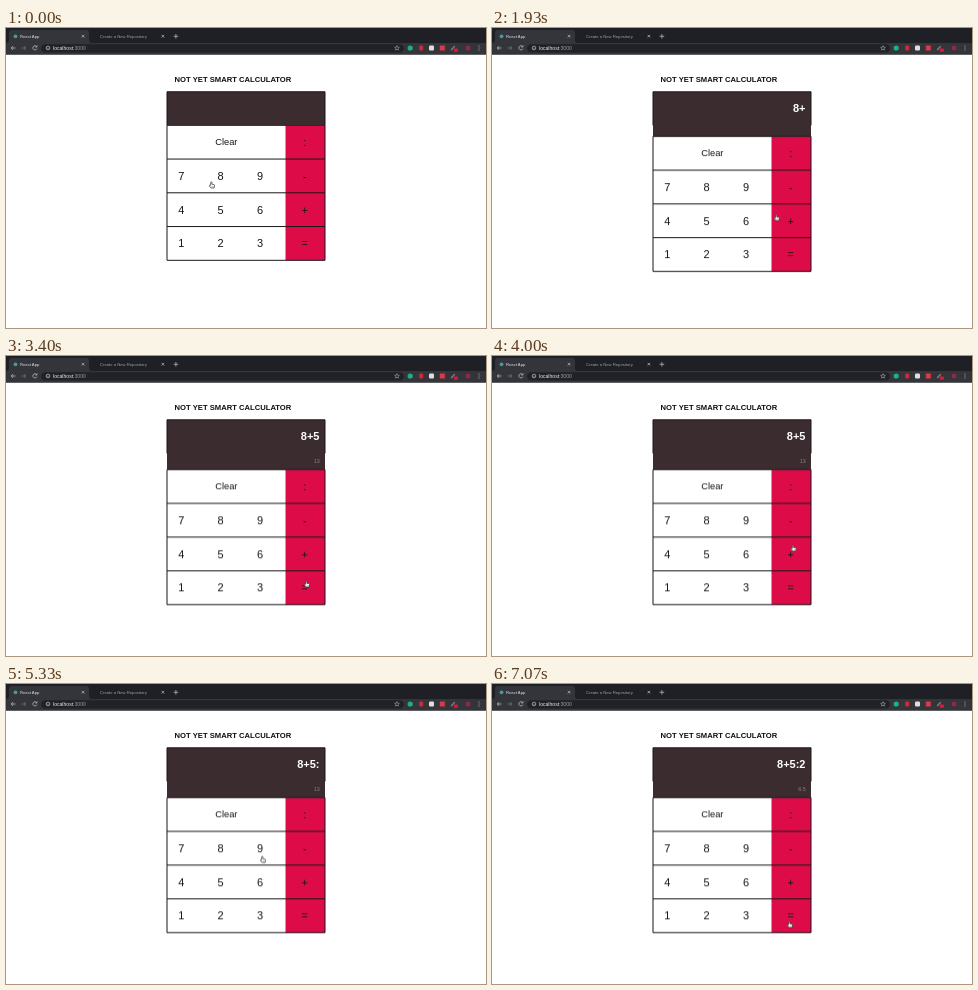
Write an HTML page that moves like this. It is 480 px wide and 300 px high and loops after 8 s.

```html
<!DOCTYPE html>
<html lang="en">
<head>
<meta charset="utf-8">
<title>React App</title>
<style>
  html, body { margin: 0; width: 100%; height: 100%; overflow: hidden; background: #fff; }
  svg { display: block; width: 100vw; height: 100vh; }
  text { font-family: "Liberation Sans", Arial, sans-serif; }
  .tab { font-size: 4.2px; }
  .url { font-size: 5.1px; fill: #e8eaed; }
  .icon { fill: none; stroke: #c4c7cb; stroke-width: .7; }
  .title { font-size: 7.65px; font-weight: bold; fill: #111; }
  .key { font-size: 11px; fill: #151515; text-anchor: middle; }
  .clear { font-size: 9.3px; }
  .line { fill: none; stroke: #1c1518; stroke-width: 1; }
  .entry { font-size: 11px; font-weight: bold; fill: #fff; text-anchor: end; }
  .result { font-size: 5.4px; fill: #8d8386; text-anchor: end; }

  .entry, .result { opacity: 0; animation: 8s step-end infinite; }
  .e1 { animation-name: e1; }
  .e2 { animation-name: e2; }
  .e3 { animation-name: e3; }
  .e4 { animation-name: e4; }
  .e5 { animation-name: e5; }
  .r1 { animation-name: r1; }
  .r2 { animation-name: r2; }
  @keyframes e1 { 0% { opacity: 0 } 10.87% { opacity: 1 } 19.12%, 100% { opacity: 0 } }
  @keyframes e2 { 0% { opacity: 0 } 19.12% { opacity: 1 } 32.5%, 100% { opacity: 0 } }
  @keyframes e3 { 0% { opacity: 0 } 32.5% { opacity: 1 } 62.5%, 100% { opacity: 0 } }
  @keyframes e4 { 0% { opacity: 0 } 62.5% { opacity: 1 } 80.8%, 100% { opacity: 0 } }
  @keyframes e5 { 0% { opacity: 0 } 80.8%, 100% { opacity: 1 } }
  @keyframes r1 { 0% { opacity: 0 } 41.6% { opacity: 1 } 88.3%, 100% { opacity: 0 } }
  @keyframes r2 { 0% { opacity: 0 } 88.3%, 100% { opacity: 1 } }

  /* the keypad is pushed down as the display grows */
  #pad { animation: grow 8s step-end infinite; }
  @keyframes grow {
    0% { transform: translate(161px, 97.3px) }
    10.87% { transform: translate(161px, 108.4px) }
    41.6%, 100% { transform: translate(161px, 113.6px) }
  }

  #hand { animation: point 8s linear infinite; }
  @keyframes point {
    0%, .5% { transform: translate(206px, 157px) }
    1.62%, 3.7% { transform: translate(219px, 157.5px) }
    6.62%, 10.87% { transform: translate(216px, 155px) }
    12.5% { transform: translate(230px, 159px) }
    16.6% { transform: translate(296px, 190px); animation-timing-function: ease-out }
    20%, 22.9% { transform: translate(300px, 196px) }
    26% { transform: translate(262px, 180px); animation-timing-function: ease-out }
    30%, 32.5% { transform: translate(219px, 194px); animation-timing-function: ease-in }
    36.62% { transform: translate(286px, 216px); animation-timing-function: ease-out }
    40%, 45.4% { transform: translate(301px, 228px); animation-timing-function: ease-in-out }
    55.87% { transform: translate(302.5px, 138px) }
    56.62%, 62.5% { transform: translate(303px, 138.5px); animation-timing-function: ease-in-out }
    66.62%, 74.6% { transform: translate(257px, 175.5px); animation-timing-function: ease-in-out }
    78.4%, 80.8% { transform: translate(216px, 237px); animation-timing-function: ease-in-out }
    85% { transform: translate(294px, 236.5px) }
    86.62%, 100% { transform: translate(298px, 240.5px) }
  }
</style>
</head>
<body>
<svg viewBox="0 0 480 300">
  <rect width="480" height="300" fill="#fff"/>

  <!-- browser bar -->
  <rect width="480" height="26.5" fill="#1e2025"/>
  <path d="M0 15Q3 15 3 12V5Q3 2 6 2H80Q83 2 83 5V12Q83 15 86 15H480V26.5H0Z" fill="#33353a"/>
  <rect x="35" y="16.2" width="363" height="8.4" rx="4.2" fill="#202227"/>
  <circle cx="9.5" cy="8.3" r="1.9" fill="#3f9aa8"/>
  <text class="tab" x="14" y="9.8" fill="#dfe1e5">React App</text>
  <text class="tab" x="94" y="9.8" fill="#9da1a7">Create a New Repository</text>
  <g class="icon">
    <path d="M75.8 6.9l2.6 2.6m0-2.6l-2.6 2.6M155.6 6.9l2.6 2.6m0-2.6l-2.6 2.6M167.6 8.3h4.6m-2.3-2.3v4.6"/>
    <path d="M9.5 20H5.2m2-2l-2 2 2 2"/>
    <path d="M15.5 20h4.3m-2-2l2 2-2 2" stroke="#74777c"/>
    <path d="M30.6 18.6a2.1 2.1 0 1 0 .3 2M31 17.4v1.6h-1.6"/>
    <circle cx="42" cy="20" r="1.8"/>
    <path d="M42 19.7v1.2" stroke-width=".6"/>
    <path d="M391 17.7l.7 1.5 1.6.2-1.2 1.1.3 1.6-1.4-.8-1.4.8.3-1.6-1.2-1.1 1.6-.2z" stroke-width=".5"/>
    <path d="M445.2 22l3.6-3.8" stroke="#85888d" stroke-width="1.2"/>
  </g>
  <text class="url" x="47" y="21.8">localhost<tspan fill="#9aa0a6">:3000</tspan></text>
  <circle cx="404.2" cy="20" r="2.6" fill="#18b287"/>
  <rect x="413.3" y="17.6" width="3.8" height="4.8" fill="#d5263c"/>
  <rect x="423" y="17.5" width="5" height="5" rx="1" fill="#dedfe1"/>
  <rect x="433.8" y="17.5" width="5" height="5" fill="#d93a4a"/>
  <rect x="447.8" y="20.4" width="4.2" height="3.4" rx=".7" fill="#d7193c"/>
  <circle cx="462" cy="20" r="2.5" fill="#8d2942"/>
  <g fill="#c4c7cb">
    <circle cx="473" cy="18" r=".5"/><circle cx="473" cy="20" r=".5"/><circle cx="473" cy="22" r=".5"/>
  </g>

  <!-- calculator -->
  <text class="title" x="168.6" y="54.2">NOT YET SMART CALCULATOR</text>
  <g id="pad">
    <path d="M0 0V-33.6H158V0Z" fill="#3b2c30"/>
    <path d="M0 0V-49.6H158V0Z" fill="#3b2c30" clip-path="url(#below)"/>
    <rect width="158" height="135" fill="#fff"/>
    <rect x="118.5" width="39.5" height="135" fill="#dd0c48"/>
    <g id="keys"></g>
    <path class="line" d="M0 0H158M0 33.75H158M0 67.5H158M0 101.25H158"/>
    <path class="line" d="M0 0V135H158V0" stroke-width=".8"/>
  </g>
  <clipPath id="below"><rect y="-33" width="158" height="33"/></clipPath>
  <rect x="161" y="63.8" width="158" height="33.6" fill="#3b2c30"/>
  <path class="line" d="M161 97.3V63.8H319V97.3" stroke-width=".8"/>
  <path class="line" id="seam" d="M161 97.3H319"/>
  <text class="entry e1" x="313.5" y="84.2">8</text>
  <text class="entry e2" x="313.5" y="84.2">8+</text>
  <text class="entry e3" x="313.5" y="84.2">8+5</text>
  <text class="entry e4" x="313.5" y="84.2">8+5:</text>
  <text class="entry e5" x="313.5" y="84.2">8+5:2</text>
  <text class="result r1" x="313.7" y="106.6">13</text>
  <text class="result r2" x="313.7" y="106.6">6.5</text>

  <g id="hand">
    <path d="M-1.3 .3V-2.5Q-1.3 -3.2 -.7 -3.2Q-.1 -3.2 -.1 -2.5V-.8L2 -.4Q2.7 -.2 2.6 .6L2.1 3H-1L-2.6 .9Q-2.8 .2 -2.1 0Z"
          fill="#fff" stroke="#222" stroke-width=".65" stroke-linejoin="round"/>
    <path d="M.2 1V2.3M1.2 1V2.3" stroke="#555" stroke-width=".35"/>
  </g>
</svg>
<script>
  const keys = document.getElementById("keys");
  const columns = [14.2, 53.6, 93, 137.8];

  function addKey(label, x, row, kind = "") {
    const key = document.createElementNS("http://www.w3.org/2000/svg", "text");
    key.setAttribute("class", "key " + kind);
    key.setAttribute("x", x);
    key.setAttribute("y", row * 33.75 + (kind ? 20.1 : 20.8));
    key.textContent = label;
    keys.append(key);
  }

  addKey("Clear", 59.3, 0, "clear");
  addKey(":", columns[3], 0);
  ["789-", "456+", "123="].forEach((labels, i) =>
    [...labels].forEach((label, col) => addKey(label, columns[col], i + 1)));

  // the first seam belongs to the keypad
  document.getElementById("seam").remove();
</script>
</body>
</html>
```
